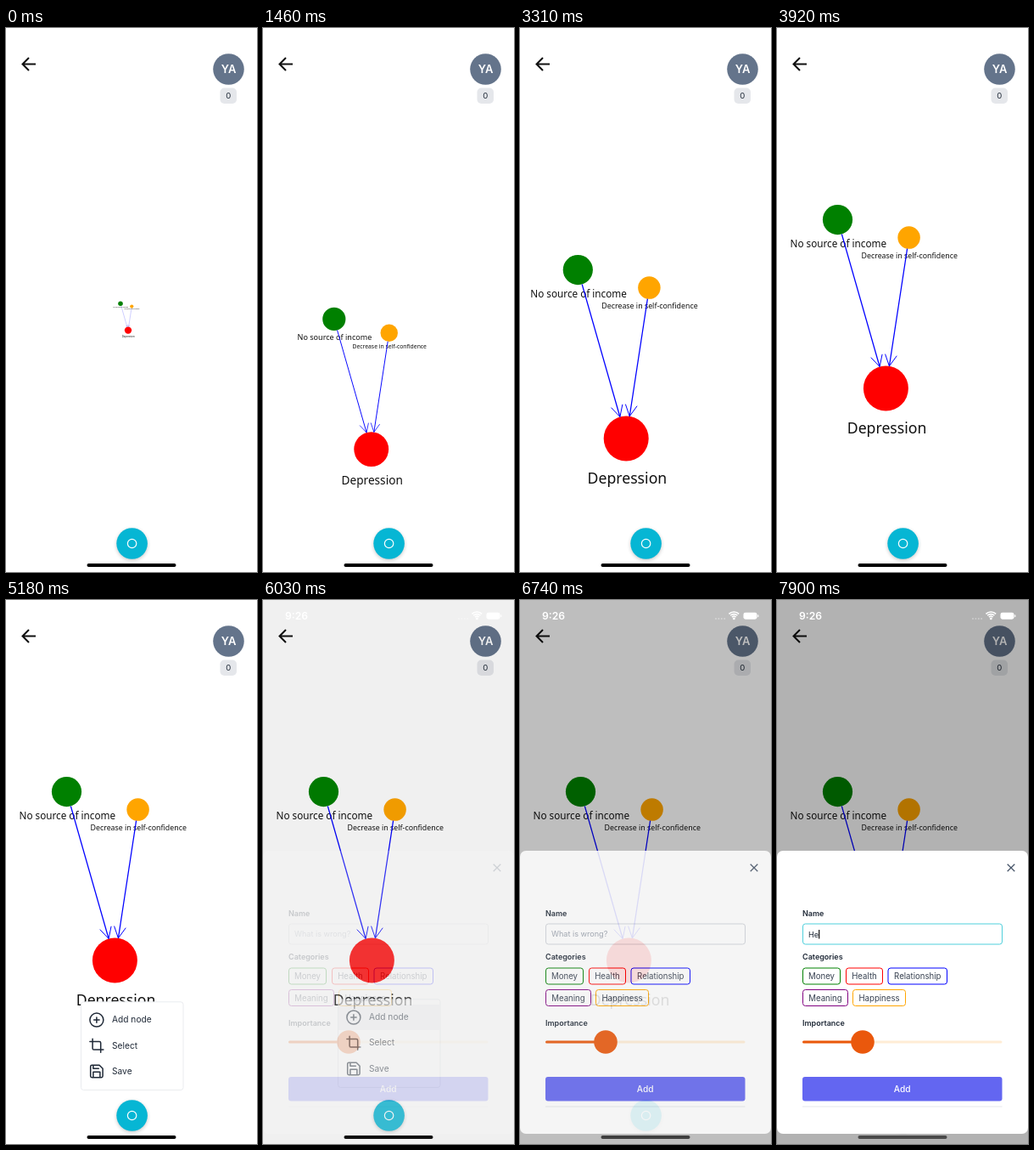
Recreate the animation shown at these times as an HTML page with a canvas. Size 296 by 640 pixels, loop 8 s.

```html
<!DOCTYPE html>
<html lang="en">
<head>
<meta charset="utf-8">
<title>Node map</title>
<style>
html, body { margin: 0; width: 100%; height: 100%; overflow: hidden; background: #fff; }
canvas { display: block; width: 296px; height: 640px; }
</style>
</head>
<body>
<canvas id="stage"></canvas>
<script>
const W = 296, H = 640, LOOP = 8000;
const dpr = window.devicePixelRatio || 1;
const UI = 'Inter, Roboto, sans-serif';
const MAP = '"Noto Sans", "Open Sans", sans-serif';

// The screen refreshes only at these moments
const TICKS = [0, 970, 1090, 1200, 1320, 1460, 1570, 1700, 1840, 1950, 2110, 2220,
  2340, 2460, 2920, 3040, 3180, 3300, 3420, 3540, 3650, 3770, 3920, 4850, 4960,
  5070, 5180, 5620, 6030, 6140, 6740, 6870, 7440, 7560, 7900];

// Motion tracks: [time, value], linear between keys
const ZOOM = [[850, .158], [1320, .694], [1460, .772], [1700, .837], [1950, .9],
  [2340, .98], [2460, .997], [2920, 1]];
const PAN = [[2800, 0], [3040, .19], [3540, .83], [3770, .98], [3920, 1]];
const MENU = [[4800, 0], [5180, 1], [5900, 1], [6140, .3], [6740, 0]];
const SHEET = [[5960, 0], [6140, .5], [6740, .85], [6870, 1]];

const NODES = [
  { name: 'No source of income', x: -56.9, y: -198.4, r: 17.6, drop: 1.84, color: '#008000' },
  { name: 'Decrease in self-confidence', x: 27.2, y: -177.4, r: 13.25, drop: 1.83, color: '#ffa500' },
  { name: 'Depression', x: 0, y: 0, r: 26.5, drop: 2, color: '#ff0000' }
];

const ITEMS = [
  ['Add node', 'M2 12a10 10 0 1 0 20 0a10 10 0 1 0-20 0M12 8v8M8 12h8'],
  ['Select', 'M6 2v14a2 2 0 0 0 2 2h14M18 22V8a2 2 0 0 0-2-2H2'],
  ['Save', 'M19 21H5a2 2 0 0 1-2-2V5a2 2 0 0 1 2-2h11l5 5v11a2 2 0 0 1-2 2zM17 21v-8H7v8M7 3v5h8']
];

const TAGS = [
  ['Money', 30.5, 433, 44, '#008000'],
  ['Health', 81.5, 433, 43, '#ff0000'],
  ['Relationship', 131, 433, 69.5, '#0000ff'],
  ['Meaning', 30.5, 458.5, 53, '#800080'],
  ['Happiness', 89.5, 458.5, 62, '#ffa500']
];

function surface(el) {
  el.width = W * dpr;
  el.height = H * dpr;
  const g = el.getContext('2d');
  g.scale(dpr, dpr);
  return g;
}
const main = surface(document.getElementById('stage'));
const layer = surface(document.createElement('canvas'));
let c = main;

function track(keys, t) {
  if (t <= keys[0][0]) return keys[0][1];
  for (let i = 1; i < keys.length; i++) {
    const [t0, a] = keys[i - 1], [t1, b] = keys[i];
    if (t <= t1) return a + (b - a) * (t - t0) / (t1 - t0);
  }
  return keys[keys.length - 1][1];
}

function text(str, x, y, size, color, weight = 400, align = 'left', family = UI) {
  c.font = `${weight} ${size}px ${family}`;
  c.textAlign = align;
  c.textBaseline = 'alphabetic';
  c.fillStyle = color;
  c.fillText(str, x, y);
}

function disc(x, y, r, color) {
  c.beginPath();
  c.arc(x, y, r, 0, Math.PI * 2);
  c.fillStyle = color;
  c.fill();
}

function box(x, y, w, h, r, fill, line, width = 1) {
  c.beginPath();
  c.roundRect(x, y, w, h, r);
  if (fill) { c.fillStyle = fill; c.fill(); }
  if (line) { c.strokeStyle = line; c.lineWidth = width; c.stroke(); }
}

function stroke(d, color, width) {
  c.strokeStyle = color;
  c.lineWidth = width;
  c.stroke(new Path2D(d));
}

// Draws a group flat, then blends it as a whole
function group(alpha, draw) {
  if (alpha <= 0) return;
  layer.clearRect(0, 0, W, H);
  c = layer;
  draw();
  c = main;
  c.globalAlpha = alpha;
  c.drawImage(layer.canvas, 0, 0, W, H);
  c.globalAlpha = 1;
}

function edge(a, b) {
  const ang = Math.atan2(b.y - a.y, b.x - a.x);
  const ux = Math.cos(ang), uy = Math.sin(ang);
  const x = b.x - ux * b.r, y = b.y - uy * b.r;
  c.strokeStyle = '#0000ff';
  c.lineWidth = 1.25;
  c.beginPath();
  c.moveTo(a.x + ux * a.r, a.y + uy * a.r);
  c.lineTo(x, y);
  c.stroke();
  c.lineWidth = 1;
  c.beginPath();
  for (const turn of [-.48, .48]) {
    c.moveTo(x, y);
    c.lineTo(x - 15 * Math.cos(ang + turn), y - 15 * Math.sin(ang + turn));
  }
  c.stroke();
}

function drawMap(t) {
  const s = track(ZOOM, t), p = track(PAN, t);
  c.save();
  c.translate(148.2 - 26.5 * s + 6.7 * p, 319.6 + 228 * s - 123.6 * p);
  c.scale(s, s);
  for (const n of NODES) {
    disc(n.x, n.y, n.r, n.color);
    text(n.name, n.x + n.r * .045, n.y + n.r * n.drop, n.r * 2 / 3, '#111', 400, 'center', MAP);
  }
  edge(NODES[0], NODES[2]);
  edge(NODES[1], NODES[2]);
  c.restore();
}

function drawChrome() {
  stroke('M35 42.5H19.8M27 35l-7.5 7.5 7.5 7.5', '#111', 2);
  disc(262.5, 48.5, 18.3, '#64748b');
  text('YA', 262.5, 53.2, 13, '#fff', 600, 'center');
  box(252.5, 70.5, 19.5, 18.5, 5, '#e5e7eb');
  text('0', 262.3, 83.2, 9.6, '#1f2937', 400, 'center');

  c.save();
  c.shadowColor = 'rgba(0,0,0,.22)';
  c.shadowBlur = 4 * dpr;
  c.shadowOffsetY = 1.5 * dpr;
  disc(148.6, 606.5, 18.3, '#06b6d4');
  c.restore();
  c.beginPath();
  c.arc(148.6, 606.5, 5.2, 0, Math.PI * 2);
  c.strokeStyle = '#fff';
  c.lineWidth = 1.2;
  c.stroke();
}

function drawMenu(t, alpha) {
  c.save();
  c.translate(0, -8 * (1 - alpha));
  box(88.5, 472.8, 120.5, 103.7, 3, '#fff', '#e5e7eb', .8);
  if (t >= 5620) box(89, 479, 119.5, 30, 0, '#f3f4f6');
  ITEMS.forEach(([name, icon], i) => {
    const y = 494 + 30.2 * i;
    text(name, 125, y + 3.3, 10.2, '#1f2937');
    c.save();
    c.translate(97.3, y - 9.5);
    c.scale(.8, .8);
    c.lineCap = c.lineJoin = 'round';
    stroke(icon, '#1f2937', 1.9);
    c.restore();
  });
  c.restore();
}

function drawSheet(t) {
  const typed = t >= 7900 ? 'He' : t >= 7560 ? 'H' : '';
  const focus = t >= 7440;
  box(0, 295, W, 333, 7, '#fff');
  stroke('M271.7 310.7l8.6 8.6M280.3 310.7l-8.6 8.6', '#475569', 1.3);

  text('Name', 30, 371.5, 9, '#1f2937', 600);
  text('Categories', 30, 423.2, 9, '#1f2937', 600);
  text('Importance', 30, 501.3, 9, '#1f2937', 600);

  box(30.5, 381, 235, 24, 3, '#fff', focus ? '#4fd0dc' : '#d1d5db');
  if (typed) text(typed, 37, 396.5, 9.1, '#1f2937');
  else text('What is wrong?', 37, 396.3, 9.1, '#9ca3af');
  if (focus) {
    c.font = `400 9.1px ${UI}`;
    c.fillStyle = '#111';
    c.fillRect(37 + c.measureText(typed).width, 388, 1.2, 10.5);
  }

  for (const [name, x, y, w, color] of TAGS) {
    box(x, y, w, 19, 3, '#fff', color);
    text(name, x + w / 2, y + 13, 9.65, '#374151', 400, 'center');
  }

  box(30, 518.5, 235.5, 3, 1.5, '#ffedd5');
  box(30, 518.5, 71, 3, 1.5, '#ea580c');
  disc(101, 520, 13.8, '#ea580c');

  box(30, 561, 235.5, 28.5, 3, '#6366f1');
  text('Add', 147.7, 579, 10.2, '#fff', 500, 'center');
  box(30, 595.6, 235.5, .8, 0, '#e5e7eb');
}

function drawStatus(sheet) {
  text('9:26', 26, 23, 12.2, '#fff', 600);
  c.save();
  c.globalAlpha = .35;
  for (let i = 0; i < 4; i++) disc(231 + i * 3.4, 22, 1, '#fff');
  c.restore();
  for (const r of [3.4, 6, 8.6]) {
    c.beginPath();
    c.arc(252.3, 22.6, r, -Math.PI * .74, -Math.PI * .26);
    c.strokeStyle = '#fff';
    c.lineWidth = 1.6;
    c.stroke();
  }
  disc(252.3, 21.9, 1.4, '#fff');
  box(263.5, 14.7, 16, 8, 2.4, '#fff');
  box(280.2, 17.2, 1.2, 3, .6, '#fff');
  const v = Math.round(74 * sheet);
  box(95.5, 630, 105, 4, 2, `rgb(${v},${v},${v})`);
}

function render(t) {
  c.fillStyle = '#fff';
  c.fillRect(0, 0, W, H);
  drawMap(t);
  drawChrome();
  const menu = track(MENU, t), sheet = track(SHEET, t);
  group(menu, () => drawMenu(t, menu));
  c.fillStyle = `rgba(0,0,0,${.3 * sheet})`;
  c.fillRect(0, 0, W, H);
  group(sheet, () => drawSheet(t));
  drawStatus(sheet);
}

const start = performance.now();
function frame() {
  const now = (performance.now() - start) % LOOP;
  render(TICKS.findLast(k => k <= now) || 0);
  requestAnimationFrame(frame);
}
frame();
</script>
</body>
</html>
```
